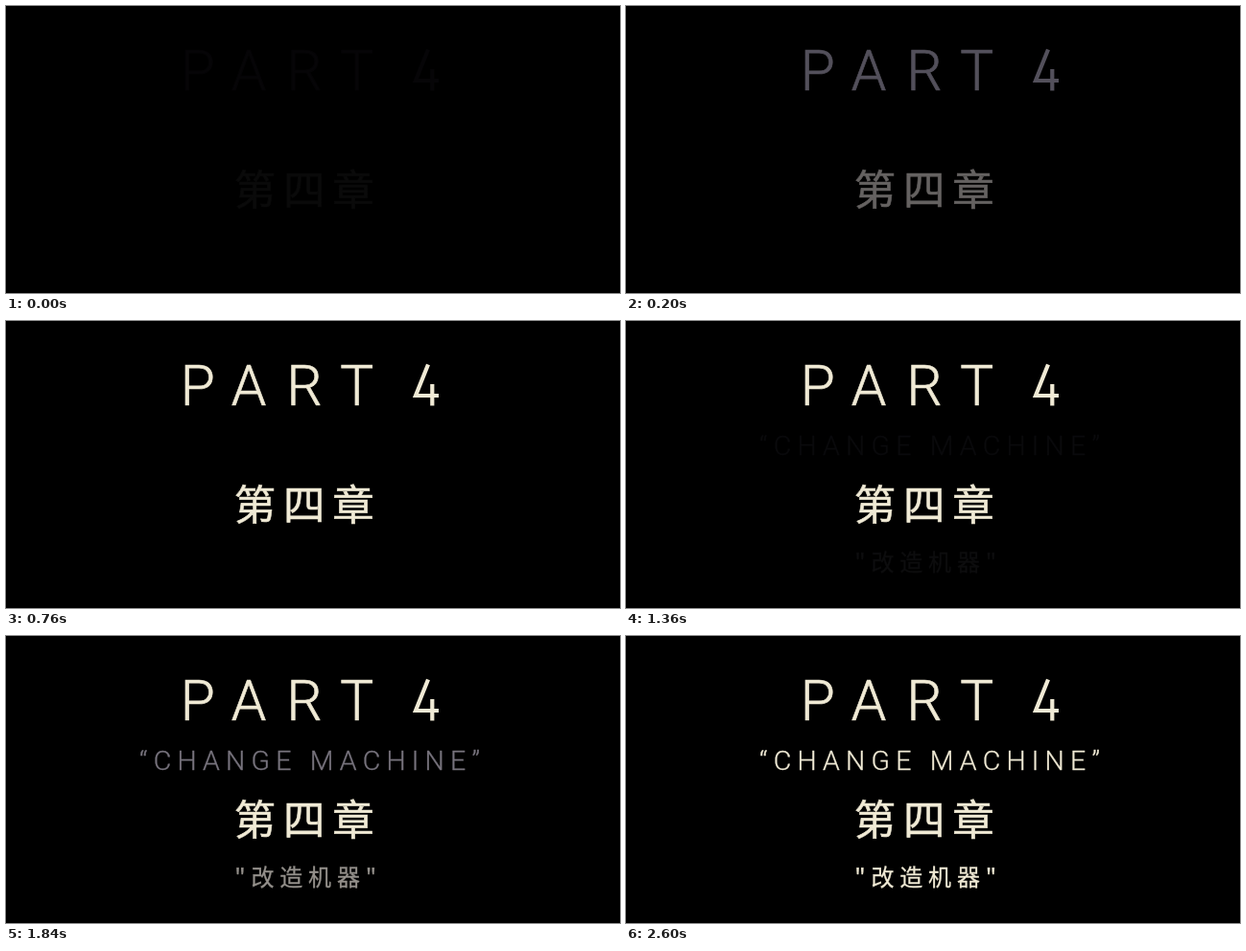
Write an HTML page with a canvas that moves like this. It is 640x300 px and loops after 3.64 s.

```html
<!DOCTYPE html>
<html lang="zh-CN">
<head>
<meta charset="utf-8">
<title>Part 4</title>
<style>
html, body { margin: 0; width: 100%; height: 100%; overflow: hidden; background: #000; }
canvas { display: block; }
</style>
</head>
<body>
<canvas id="stage" width="640" height="300" role="img" aria-label="PART 4 “CHANGE MACHINE” 第四章 &quot;改造机器&quot;"></canvas>
<script>
const ctx = document.getElementById('stage').getContext('2d');
const LOOP = 3640, STEP = 40;
const LATIN = 'Roboto, sans-serif';
const HAN = '"Noto Sans CJK SC", "Noto Sans CJK", "Noto Sans CJK JP", sans-serif';
const CREAM = [240, 234, 213], VIOLET = [225, 215, 275], SILVER = [235, 228, 240];

const start = performance.now();

// Smooth fade in from black that warms from a cool tint to cream.
function fadeColor(t, begin, duration, tint) {
  const x = Math.min(1, Math.max(0, (t - begin) / duration));
  const level = x * x * (3 - 2 * x);
  const rgb = CREAM.map((warm, i) => Math.round(level * (tint[i] + (warm - tint[i]) * level)));
  return `rgb(${rgb})`;
}

// Draws tracked text with its ink centred on x; a thin outline adds weight.
function drawText(text, font, tracking, x, baseline, outline) {
  ctx.font = font;
  ctx.letterSpacing = `${tracking}px`;
  ctx.fontKerning = 'normal';
  ctx.lineWidth = outline;
  const ink = ctx.measureText(text);
  // The advance after the last letter is not ink.
  const left = x + (ink.actualBoundingBoxLeft - ink.actualBoundingBoxRight) / 2;
  ctx.fillText(text, left, baseline);
  ctx.strokeText(text, left, baseline);
}

// Open-topped numeral
function drawFour() {
  ctx.lineWidth = 4.2;
  ctx.beginPath();
  ctx.moveTo(440, 45.5);
  ctx.lineTo(427, 78);
  ctx.lineTo(451, 78);
  ctx.moveTo(444.3, 66);
  ctx.lineTo(444.3, 88.5);
  ctx.stroke();
}

function useColor(color) {
  ctx.fillStyle = ctx.strokeStyle = color;
}

function render() {
  const elapsed = Math.max(0, performance.now() - start) % LOOP;
  const t = Math.floor(elapsed / STEP) * STEP;
  ctx.fillStyle = '#000';
  ctx.fillRect(0, 0, 640, 300);

  useColor(fadeColor(t, -60, 640, VIOLET));
  drawText('PART', `300 58.5px ${LATIN}`, 21, 284.5, 88.3, 0.7);
  drawFour();

  useColor(fadeColor(t, -75, 610, SILVER));
  drawText('第四章', `500 43.5px ${HAN}`, 7.7, 311, 208.4, 0.6);

  // The second pair stays hidden until its first visible step.
  if (t >= 1360) {
    useColor(fadeColor(t, 1200, 1260, VIOLET));
    drawText('“CHANGE MACHINE”', `300 28.5px ${LATIN}`, 6.2, 316.7, 139.6, 0.3);

    useColor(fadeColor(t, 1200, 1100, SILVER));
    drawText('"改造机器"', `400 24px ${HAN}`, 5.8, 312.5, 260.5, 0.3);
  }
  requestAnimationFrame(render);
}
render();
</script>
</body>
</html>
```
